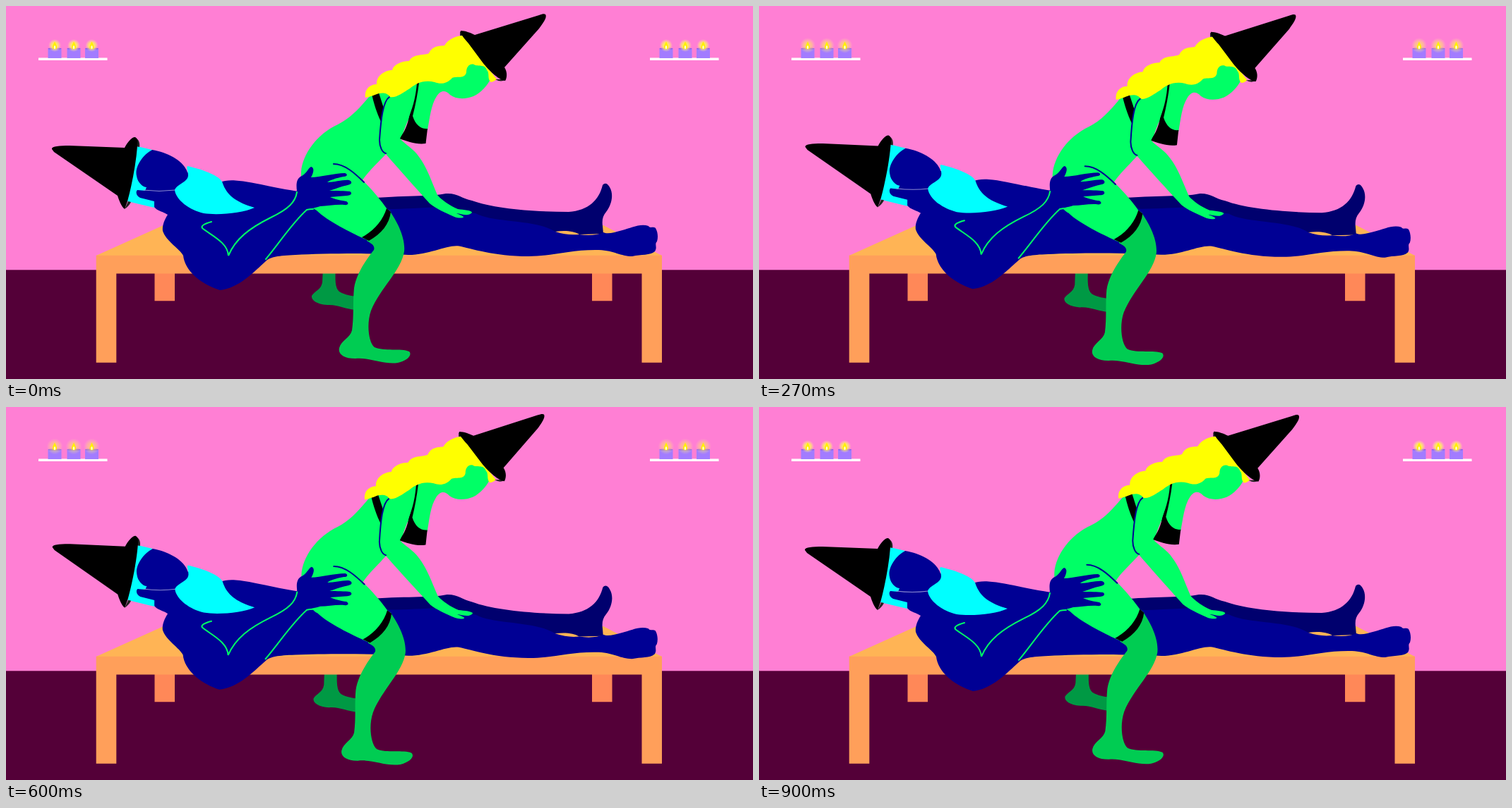
Animation, 1058 px wide and 529 px high, one loop 0.93 s. Source, as an HTML page:

```html
<!DOCTYPE html>
<html lang="en">
<head>
<meta charset="utf-8">
<title>Witches by candlelight</title>
<style>
  html, body { margin: 0; width: 100%; height: 100%; overflow: hidden; background: #ff7fd4; }
  svg { display: block; width: 100%; height: 100%; }
  .navy { fill: #000094; }
  .green { fill: #00ff66; }
  .line { fill: none; stroke-width: 2; stroke-linecap: round; }
</style>
</head>
<body>
<svg viewBox="0 0 1058 529">
  <defs>
    <radialGradient id="halo">
      <stop offset="0" stop-color="#fff36b"/>
      <stop offset=".5" stop-color="#ffee60" stop-opacity=".85"/>
      <stop offset="1" stop-color="#ffe0a8" stop-opacity="0"/>
    </radialGradient>
    <g id="candle">
      <rect x="-9.5" y="60" width="19" height="14" fill="#a27cff"/>
      <ellipse cy="60.5" rx="9.5" ry="1.3" fill="#8b55e6"/>
      <circle class="glow" cy="56" r="9" fill="url(#halo)"/>
      <path d="M0 50.500C2 54 3 56 3 58.500C3 62-3 62-3 58.500C-3 56-2 54 0 50.500Z" fill="#fff000"/>
      <ellipse cy="58.500" rx="1.300" ry="2.500" fill="#fffbd0"/>
    </g>
    <g id="shelf">
      <rect x="46" y="73.500" width="97.500" height="3.500" fill="#fff"/>
      <use href="#candle" x="69"/><use href="#candle" x="96"/><use href="#candle" x="121.500"/>
    </g>
  </defs>

  <rect width="1058" height="529" fill="#ff7fd4"/>
  <rect y="374.300" width="1058" height="155" fill="#540038"/>
  <use href="#shelf"/>
  <use href="#shelf" x="866"/>

  <!-- far foot, then table -->
  <g class="woman">
    <path fill="#009944" d="M449 370H467C466 388 466 400 472 405C480 410 490 411 496 412V431C480 430 470 423 455 424C440 423 432 417 433 411C437 404 446 403 448 392Z"/>
  </g>
  <path fill="#ff8858" d="M210.500 379h28.500v39.300h-28.500zM830 379h28.500v39.300h-28.500z"/>
  <path fill="#ffb455" d="M127.700 354L223 311H846L929 354Z"/>
  <path fill="#ff9f5a" d="M127.700 353.700H929V505.700H900.500V379.600H156.300V505.700H127.700Z"/>

  <g class="man">
    <path fill="#00006e" d="M500 274C560 268 600 271 623 266C640 265 645 273 660 276C690 287 745 292 797 292C825 290 840 275 845 254C849 249 853 253 855 257C861 267 858 282 850 292C845 298 844 304 845 312L846 323L812 324C805 319 790 318 778 320L600 310L500 300Z"/>
    <path fill="#00ffff" d="M186 199L207 204L215 260V285L210 286L172 277Z"/>
    <path class="navy" d="M207 204C230 208 252 220 257 236L304 250C308 248 315 247 325 247.500C350 249 385 260 430 265L540 288C565 288 590 286 612 285C630 289 645 293 665 294C690 308 750 302 778 320C790 324 800 325 812 324C825 326 838 325 846 321C852 324 862 321 873 318C885 315 898 308 910 312C912 316 916 312 920 315C923 320 924 328 922 334C918 338 923 342 919 348C912 354 900 352 887 355C870 355 862 347 840 346C800 345 775 355 740 355C690 355 660 344 642 340.500C625 338 600 353 570 353C520 350 450 351 410 353C385 354 375 356 369 361C350 378 330 400 303 403C270 392 253 372 251 354C246 344 227 334 222 319C221 312 224 304 229 296C224 292 214 291 210 285V277L190 272C185 270 183 264 186 261L197 262L199 257C193 257 186 249 185 241C182 230 192 212 207 204Z"/>
    <path d="M194 261Q217 264 240 261" fill="none" stroke="#8b8bd0"/>
    <path fill="#00ffff" d="M257 227C275 231 300 239 306 249C312 268 325 278 352 286C335 294 300 297 280 294C255 288 240 272 239 261C241 253 258 250 258 240C258 234 255 230 257 227Z"/>
    <path fill="#222" d="M182 187C188 188 190 194 189 200L184 199ZM173 277L177 278Q174 284 168 288Z"/>
    <path d="M65 203C64 199 75 198 90 198L168 201C172 193 179 185 183 186C187 188 187 193 186 199C184 225 178 255 172 277L168 288C163 284 160 275 158 269L68 207Z"/>
  </g>

  <g class="woman">
    <path fill="#00cc52" d="M543 290C553 304 566 328 564 348C560 375 530 400 517 432C510 452 514 478 522 484C535 490 560 485 571 490C576 495 568 503 555 506C535 509 515 498 495 500C478 500 470 493 472 485C474 475 488 470 490 460C493 440 491 420 493 400C496 380 510 360 521 346C523 340 518 337 511 333Z"/>
    <path class="green" d="M520 122C503 142 490 158 470 168C440 182 420 210 418 235C417 265 430 285 440 290C455 305 490 322 505 329L514 333C531 323 542 309 545 292L539 287C530 274 517 259 505 247C510 238 527 222 538 210L560 188L584 108L560 110Z"/>
    <path d="M539 287L545 292C543 309 532 323 514 333L504 328C521 319 534 304 539 287Z"/>
    <path class="green" d="M580 105L655 75L683 82L685 106C681 113 673 123 662 128C652 132 638 133 629 126C622 118 615 120 610 128C602 140 600 160 597 176L575 172L568 160Z"/>
    <path d="M518 125L528 123L535 145L532 166C525 152 521 138 518 125Z"/>
    <path d="M582 108L585 109C583 125 580 140 576 156C580 169 588 175 597 174L594.500 195C582 197 568 192 557 188C565 178 569 168 571 156C577 142 581 125 582 108Z"/>
    <path class="green" d="M543 129C534 135 531 160 529 190C529 200 533 206 538 210C550 224 580 258 600 280C608 287 622 293 635 299C640 301 648 301 648 299C646 297 640 295 638 294C645 295 655 299 660 293C660 290 648 289 640 288C628 283 617 275 611 268C603 250 597 230 585 214C577 202 567 198 558 188C567 170 573 153 576 138L582 108Z"/>
    <path class="line" stroke="#000094" d="M543 129C534 135 531 160 529 190C529 200 533 208 538 209M464 224C480 224 495 238 507 250"/>
    <path fill="#ffff00" d="M509 130C507 119 515 111 525 111C524 99 537 91 547 91C549 82 562 78 571 78C577 67 590 71 599 67C604 56 614 57 621 56C627 46 639 42 648 42L695 104C690 108 686 109 685 106C682 101 685 95 681 91C678 81 668 87 663 83C656 81 652 87 652 94C650 104 638 99 632 102C624 111 615 111 607 108C592 104 580 110 572 117C562 123 552 131 544 129C540 123 534 123 528 124C520 127 515 129 509 130Z"/>
    <path fill="#222" d="M643 36L650 42H643ZM693 104L707 104Q702 109 693 104Z"/>
    <path d="M764 12C767 16 760 25 755 32L706 87C711 95 709 103 707 106C700 106 685 93 675 80L655 53C648 45 643 39 644 35C650 35 658 38 664 41L755 13C760 11 763 11 764 12Z"/>
  </g>

  <g class="man">
    <path class="navy" d="M412 262C411 254 411 246 417 242C425 239 428 230 432 228C437 229 436 236 432 243C445 243 465 237 480 237C484 238 484 242 478 242C468 244 458 247 455 250C465 250 478 246 486 247C491 249 490 253 484 254C474 256 465 260 458 262C468 262 480 262 487 263C491 265 489 269 483 269L459 271C465 274 475 276 482 277C486 279 485 283 479 282C468 281 455 284 445 284C436 287 430 287 424 290L405 300L395 280Z"/>
    <path class="line" stroke="#00ff66" d="M291 306C280 309 276 312 278 315C290 325 314 335 315 354C325 330 345 315 375 300C400 288 410 278 412 264M368 359C388 335 405 308 426 289Q430 288 435 288"/>
  </g>
</svg>
<script>
  const LOOP = 930, STEP = 30;
  const setAll = (selector, name, value) =>
    document.querySelectorAll(selector).forEach(el => el.setAttribute(name, value));
  const glow = document.querySelector('.glow');

  function draw(now) {
    const phase = Math.floor(now % LOOP / STEP) * STEP / LOOP * 2 * Math.PI;
    const lift = (1 - Math.cos(phase)) / 2;
    const sway = Math.sin(phase);
    const x = 2.7 * lift - 1.6 * sway;
    const y = 2 * lift + 1.1 * sway;
    setAll('.man', 'transform', `rotate(${0.53 * lift} 600 300)`);
    setAll('.woman', 'transform', `translate(${x} ${y}) rotate(${-0.84 * lift} 573 492)`);
    glow.setAttribute('r', 9 + 3 * lift);
    glow.setAttribute('opacity', 1 - 0.6 * lift);
  }

  function tick() {
    draw(performance.now());
    requestAnimationFrame(tick);
  }
  tick();
</script>
</body>
</html>
```
